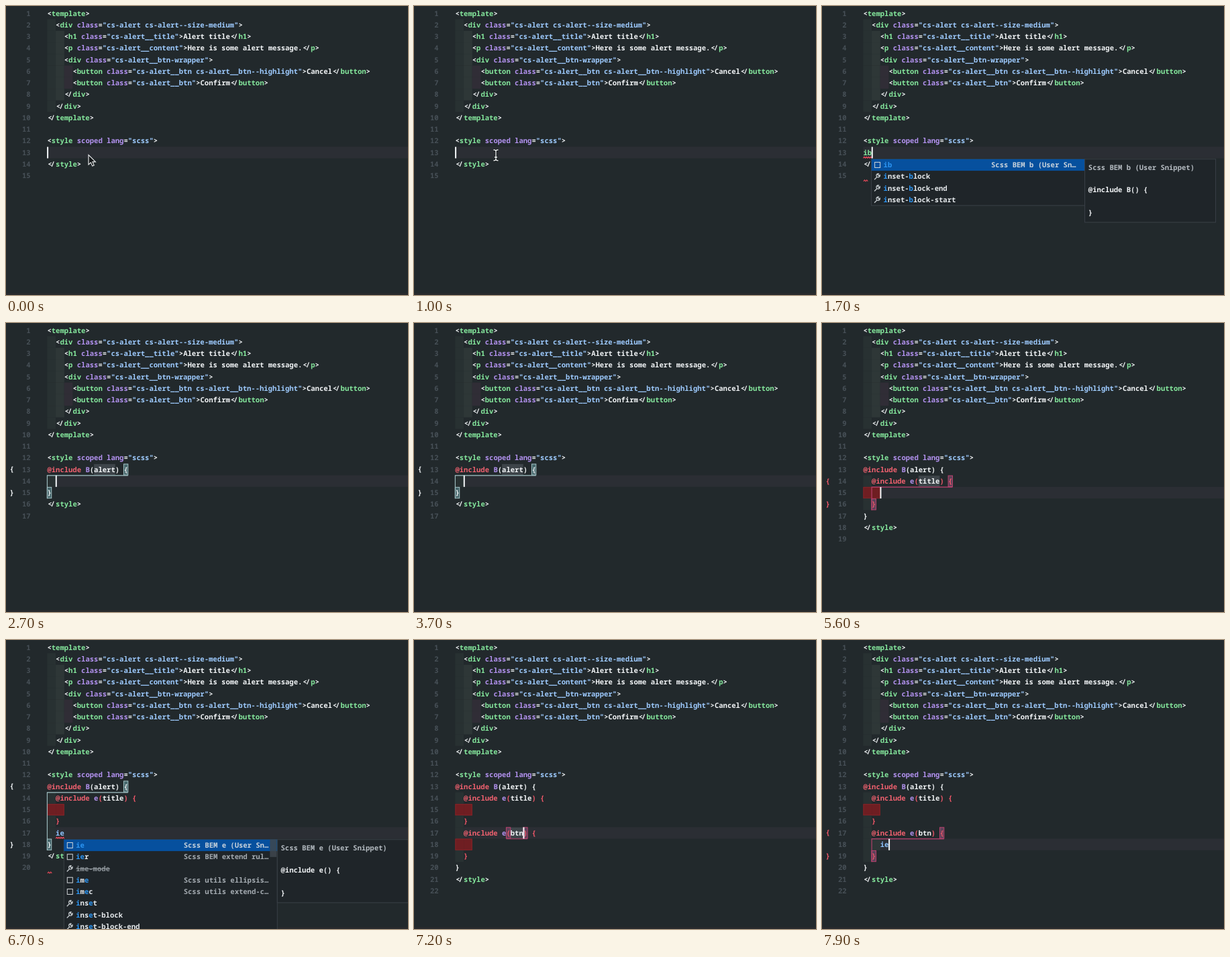
An HTML page for the animation above (8 s loop, 599 px wide and 430 px high).

```html
<!DOCTYPE html>
<html lang="en">
<head>
<meta charset="utf-8">
<title>Snippet typing</title>
<style>
  html, body { margin: 0; width: 100%; height: 100%; overflow: hidden; background: #22292c; }
  svg { display: block; width: 599px; height: 430px; }
  text {
    font: 600 10.56px "Noto Sans Mono", "DejaVu Sans Mono", monospace;
    text-rendering: geometricPrecision;
    font-variant-ligatures: none;
    white-space: pre;
  }
</style>
</head>
<body>
<svg id="stage" viewBox="0 0 599 430">
  <rect width="599" height="430" fill="#22292c"/>
  <g id="editor"></g>
  <rect id="caret" width="2" height="17" fill="#f4f8fa"/>
  <rect y="427" width="599" height="3" fill="#282a2d"/>
  <g id="popup"></g>
  <path id="arrow" d="M0 0V14.5L3.4 11.4L5.7 16.6L8.2 15.5L6 10.4H10.4Z" fill="#15181a" stroke="#eef1f2" stroke-width="1.1"/>
  <g id="beam" fill="none">
    <path d="M-3.5 -8Q0 -8 0 -6Q0 -8 3.5 -8M0 -6V6M-3.5 8Q0 8 0 6Q0 8 3.5 8M-2 3H2" stroke="#15181a" stroke-width="3"/>
    <path d="M-3.5 -8Q0 -8 0 -6Q0 -8 3.5 -8M0 -6V6M-3.5 8Q0 8 0 6Q0 8 3.5 8M-2 3H2" stroke="#f0f3f4" stroke-width="1.3"/>
  </g>
</svg>
<script>
const LOOP = 8000, CHAR = 6.336, LINE = 17.25, LEFT = 61.4, FIRST = 13;
const C = { text: '#f1f4f6', tag: '#85e89d', attr: '#b392f0', str: '#9ecbff',
            key: '#f0616f', prop: '#8fc5ff', num: '#475057' };
const LEVELS = [
  { ink: '#f1f4f6', scope: '#a3c3c6', fill: '#45656a' },
  { ink: '#f4586a', scope: '#bd4370', fill: '#5b4158' }
];
const INDENTS = ['#283132', '#2e3737', '#302d36'];

const HEAD = `<template>
  <div class="cs-alert cs-alert--size-medium">
    <h1 class="cs-alert__title">Alert title</h1>
    <p class="cs-alert__content">Here is some alert message.</p>
    <div class="cs-alert__btn-wrapper">
      <button class="cs-alert__btn cs-alert__btn--highlight">Cancel</button>
      <button class="cs-alert__btn">Confirm</button>
    </div>
  </div>
</template>

<style scoped lang="scss">`.split('\n');

const ITEMS = [
  ['ib', 'Scss BEM b (User Sn…'],
  ['ie', 'Scss BEM e (User Sn…'],
  ['ier', 'Scss BEM extend rul…'],
  ['ime-mode'],
  ['ime', 'Scss utils ellipsis…'],
  ['imec', 'Scss utils extend-c…'],
  ['inset'], ['inset-block'], ['inset-block-end'], ['inset-block-start'],
  ['inset-inline'], ['inset-inline-end'], ['inset-inline-start']
];

// Each step holds the style block, with | marking the caret.
const steps = [];
const step = (at, code, opts = {}) => steps.push({ at, code, ...opts });
const typeWord = (at, gap, word, wrap) => {
  for (let n = 0; n <= word.length; n++) step(at + n * gap, wrap(word.slice(0, n) + '|'), { hot: true });
};

const inB = inner => `@include B(alert) {\n${inner}\n}`;
const titleRule = '  @include e(title) {\n    \n  }';
step(0, '|');
step(1300, 'i|', { prefix: 'i' });
step(1500, 'ib|', { prefix: 'ib' });
typeWord(1900, 100, 'alert', w => `@include B(${w}) {\n  \n}`);
step(2600, inB('  |'), { hot: true });
step(3800, inB('  i|'));
step(4000, inB('  ie|'), { prefix: 'ie' });
typeWord(4700, 120, 'title', w => inB(`  @include e(${w}) {\n    \n  }`));
step(5500, inB('  @include e(title) {\n    |\n  }'), { hot: true });
step(5800, inB(titleRule + '|'));
step(6000, inB(titleRule + '\n  |'));
step(6100, inB(titleRule + '\n  i|'));
step(6200, inB(titleRule + '\n  ie|'), { prefix: 'ie' });
typeWord(6800, 120, 'btn', w => inB(`${titleRule}\n  @include e(${w}) {\n    \n  }`));
const btnRule = body => inB(`${titleRule}\n  @include e(btn) {\n    ${body}\n  }`);
step(7400, btnRule('|'), { hot: true });
step(7700, btnRule('i|'));
step(7800, btnRule('ie|'));

const $ = id => document.getElementById(id);
const colX = col => LEFT + col * CHAR;
const lineTop = n => 2.4 + (n - 1) * LINE;
const esc = s => s.replace(/&/g, '&amp;').replace(/</g, '&lt;');
const text = (x, y, s, fill, extra = '') => `<text x="${x.toFixed(2)}" y="${y.toFixed(2)}" fill="${fill}" ${extra}>${esc(s)}</text>`;
const rect = (x, y, w, h, fill, extra = '') => `<rect x="${x}" y="${y}" width="${w}" height="${h}" fill="${fill}" ${extra}/>`;
const path = (d, stroke, width = 1) => `<path d="${d}" fill="none" stroke="${stroke}" stroke-width="${width}"/>`;
const squiggle = (x, y, n) => path(`M${x} ${y}` + 'l1.6 -2l1.6 2'.repeat(n), '#ea4a5a', 1.1);

function htmlTokens(line) {
  const out = [];
  for (const part of line.match(/<[^>]*>|[^<]+/g) || []) {
    if (part[0] !== '<') { out.push([part, C.text]); continue; }
    let named = false;
    for (const s of part.match(/<\/?|>|=|"[^"]*"|\w+|\s+/g)) {
      let fill = C.text;
      if (s[0] === '"') fill = C.str;
      else if (/\w/.test(s)) { fill = named ? C.attr : C.tag; named = true; }
      out.push([s, fill]);
    }
  }
  return out;
}

function scssTokens(line, depth) {
  const parts = line.match(/@\w+|\w+|[(){}]|\s+/g) || [];
  return parts.map((s, i) => {
    let fill = C.text;
    if (s[0] === '@') fill = C.key;
    else if (/[(){}]/.test(s)) fill = LEVELS[s === '}' ? depth - 1 : depth].ink;
    else if (parts[i + 1] === '(') fill = C.attr;
    else if (/^i[be]?$/.test(s)) fill = depth ? C.prop : C.tag;
    return [s, fill];
  });
}

function drawTokens(tokens, n) {
  const y = lineTop(n) + 12.3;
  let col = 0, out = '';
  for (const [s, fill] of tokens) {
    if (s === '</') out += text(colX(col) + .8, y, '<', fill) + text(colX(col + 1) - 1.2, y, '/', fill);
    else if (s.trim()) out += text(colX(col), y, s, fill);
    col += s.length;
  }
  return out;
}

function place(code, offset) {
  const before = code.slice(0, offset).split('\n');
  return { line: FIRST + before.length - 1, col: before.at(-1).length };
}

// Innermost bracket pair around the caret.
function findScope(code, caret) {
  const stack = [];
  for (let i = 0; i < code.length; i++) {
    if (/[({]/.test(code[i])) {
      stack.push({ at: i, level: stack.filter(b => code[b.at] === '{').length });
    } else if (/[)}]/.test(code[i])) {
      const open = stack.pop();
      if (open.at < caret && i >= caret) {
        return { level: open.level, open: place(code, open.at), close: place(code, i) };
      }
    }
  }
}

function drawScope({ level, open, close }) {
  const { ink, scope, fill } = LEVELS[level];
  const box = p => rect(colX(p.col), lineTop(p.line) + .5, CHAR, LINE - 1, fill, `stroke="${scope}"`);
  const y = lineTop(open.line + 1) + .2;
  let out = box(open) + box(close);
  if (open.line === close.line) return out + path(`M${colX(open.col)} ${y}H${colX(close.col + 1)}`, scope);
  out += path(`M${colX(open.col + 1)} ${y}H${colX(close.col)}V${lineTop(close.line + 1)}`, scope, 1.1);
  return out + text(5.5, lineTop(open.line) + 12, '{', ink) + text(5.5, lineTop(close.line) + 12, '}', ink);
}

function drawEditor(s, errors) {
  const offset = s.code.indexOf('|'), code = s.code.replace('|', '');
  const caret = place(code, offset), body = code.split('\n');
  const lines = [...HEAD, ...body, '</style>', ''];
  const scope = findScope(code, offset);
  let under = rect(LEFT, lineTop(caret.line), 599 - LEFT, LINE, '#2b2e34'), over = '', depth = 0;

  lines.forEach((line, i) => {
    const n = i + 1, top = lineTop(n), pad = line.match(/^ */)[0].length;
    const bad = pad === 4 && !line.trim();
    for (let k = 0; k < pad / 2; k++) {
      under += rect(colX(k * 2), top, CHAR * 2, LINE, bad ? '#6f1e22' : INDENTS[k]);
    }
    if (bad) under += rect(LEFT + .5, top + .5, CHAR * 4 - 1, LINE - 1, 'none', 'stroke="#842428"');
    const inBody = n >= FIRST && n < FIRST + body.length;
    over += text(36.6, top + 12.3, String(n), C.num, 'text-anchor="end"');
    over += drawTokens(inBody ? scssTokens(line, depth) : htmlTokens(line), n);
    if (inBody) depth += line.split('{').length - line.split('}').length;
  });

  if (s.hot) {
    const n = scope && scope.open.line, arg = n && lines[n - 1].match(/\((\w+)\)/);
    if (arg) under += rect(colX(arg.index + 1), lineTop(n) + .5, arg[1].length * CHAR, LINE - 1, '#3d4449');
  }
  if (scope) under += drawScope(scope);
  if (errors) {
    over += squiggle(colX(caret.col - s.prefix.length), lineTop(caret.line + 1) - .3, 4);
    over += squiggle(LEFT + .5, lineTop(lines.length + 1) - .3, 2);
  }
  $('editor').innerHTML = under + over;
  $('caret').setAttribute('x', colX(caret.col) - .3);
  $('caret').setAttribute('y', lineTop(caret.line) + .2);
  return caret;
}

function matchRow(label, prefix) {
  let k = 0;
  const hits = [...label].map(ch => ch === prefix[k] && ++k > 0);
  return k === prefix.length && hits;
}

function drawPopup(prefix, caret) {
  const x = colX(caret.col - prefix.length) + 12.2, top = lineTop(caret.line + 1) + 1.2, W = 318;
  const rows = ITEMS.filter(([label]) => matchRow(label, prefix)).slice(0, 12);
  const H = rows.length * LINE;
  let out = rect(x, top, W, H, '#1f2529', 'stroke="#3a4147"') + rect(x, top, W, LINE, '#06509e');
  if (rows.length === 12 || prefix === 'ie') out += rect(x + W - 11, top, 10, 26, '#3f474e', 'opacity=".85"');

  rows.forEach(([label, detail], i) => {
    const mid = top + (i + .5) * LINE, base = mid + 3.6, old = label === 'ime-mode';
    out += detail
      ? rect(x + 5, mid - 4, 8, 8, 'none', 'stroke="#d0d5d9"')
      : path(`M${x + 4.5} ${mid + 4.5}l4.2 -4.2m4 -2.6a2.7 2.7 0 1 1 -2 -1.9l-1.3 1.5 1.8 1.8z`, '#c3c9cd', 1.3);
    const hits = matchRow(label, prefix);
    [...label].forEach((ch, k) => {
      out += text(x + 18 + k * CHAR, base, ch, old ? '#8b9298' : hits[k] ? '#2b95f3' : '#e6eaed');
    });
    if (old) out += path(`M${x + 18} ${mid + .5}h${label.length * CHAR}`, '#8b9298');
    if (detail) out += text(x + W - 13, base, detail, i ? '#a4abb1' : '#c9d3dc', 'text-anchor="end"');
  });

  const name = rows[0][0][1], dx = x + W;
  out += rect(dx, top, 195, 94, '#1f2529', 'stroke="#3a4147"');
  out += text(dx + 5.2, top + 16, `Scss BEM ${name} (User Snippet)`, '#b4bbc1');
  out += text(dx + 5.2, top + 49, `@include ${name === 'b' ? 'B' : name}() {`, C.text);
  return out + text(dx + 5.2, top + 83, '}', C.text);
}

let shown = '';
function render(t) {
  const s = steps.findLast(e => e.at <= t), open = !!s.prefix && t >= s.at + 100;
  const key = s.at + '/' + open;
  if (key !== shown) {
    shown = key;
    const caret = drawEditor(s, open);
    $('popup').innerHTML = open ? drawPopup(s.prefix, caret) : '';
  }
  $('caret').style.display = (t - s.at) % 1000 < 500 ? '' : 'none';
  $('arrow').style.display = t < 500 ? '' : 'none';
  $('beam').style.display = t >= 500 && t < 1300 ? '' : 'none';
  $('arrow').setAttribute('transform', 'translate(123 221.5)');
  $('beam').setAttribute('transform', 'translate(122 222)');
}

const start = performance.now();
function tick() {
  render((performance.now() - start) % LOOP);
  requestAnimationFrame(tick);
}
tick();
</script>
</body>
</html>
```
